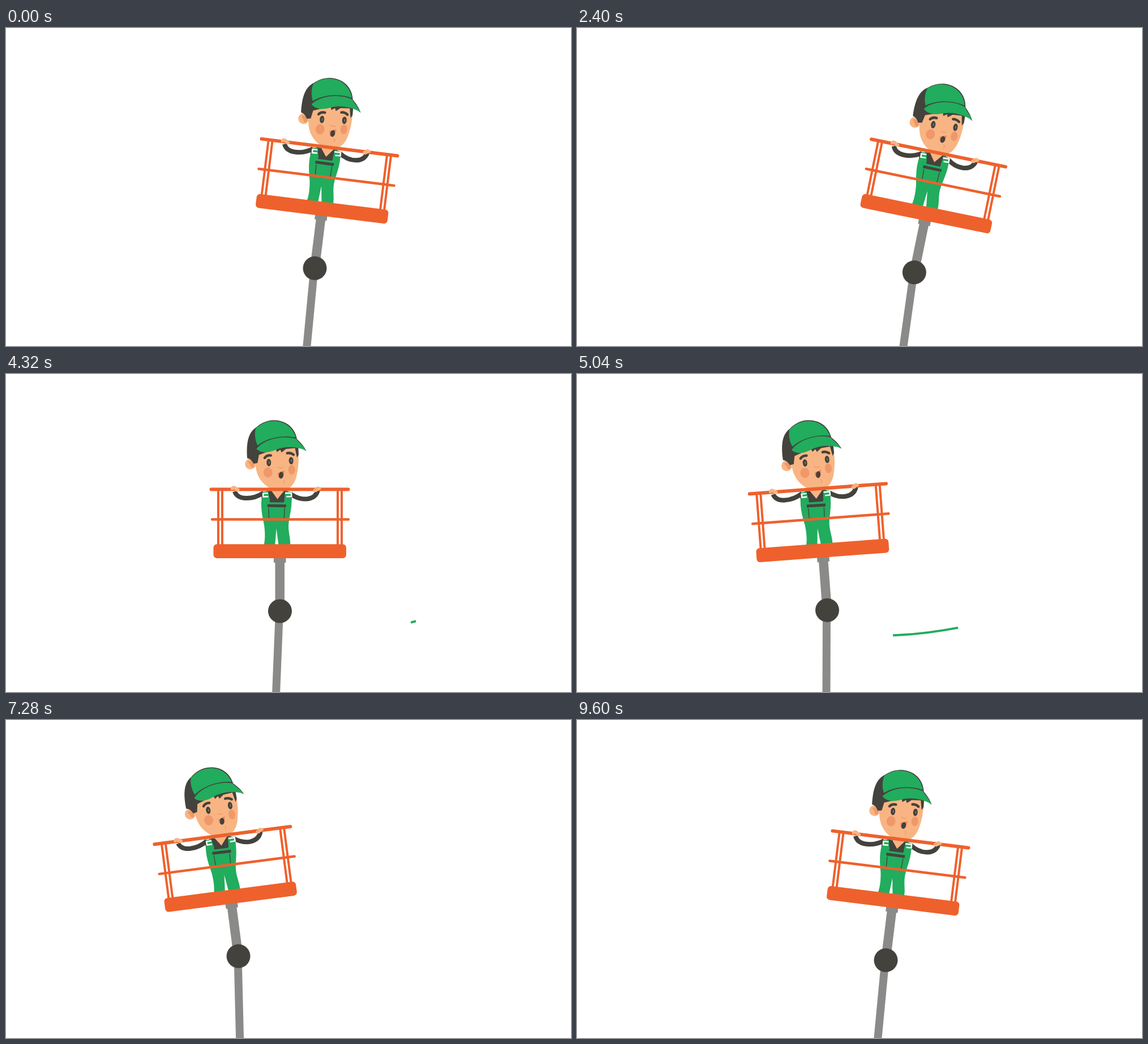
These frames come from a looping animation (998 px wide and 561 px high, 9680 ms). An HTML page:

```html
<!DOCTYPE html>
<html lang="en">
<head>
<meta charset="utf-8">
<title>Worker on a swaying lift</title>
<style>
html, body { margin: 0; width: 100%; height: 100%; overflow: hidden; background: #fff; }
svg { display: block; width: 100vw; height: 100vh; }
.green { fill: #22ac5d; }
.dark { fill: #43423d; }
.skin { fill: #f8b583; }
.blush { fill: #f0986a; }
.grey { fill: #8a8a88; }
.orange { fill: #ee612d; }
.line { fill: none; stroke: #43423d; }
.rail { fill: none; stroke: #ee612d; stroke-linecap: round; }
.round { stroke-linecap: round; }
</style>
</head>
<body>
<svg viewBox="0 0 998 561">
  <g id="gusts" fill="none" stroke="#22ac5d"></g>
  <g id="boom"><rect class="grey" x="-8" width="14" height="220"/></g>
  <g id="lift">
    <rect class="grey" x="-8.5" y="-100" width="16.5" height="100"/>
    <rect class="grey" x="-11" y="-100" width="21.5" height="14.5"/>
    <circle class="dark" r="21"/>
    <g transform="rotate(-1.9) translate(-498 -419.5)">
      <!-- arms and body -->
      <path class="line" stroke-width="8" d="M425 206C430 222 456 222 476 210M572 209C566 227 542 228 523 213"/>
      <path class="dark" d="M482 207L516 207L526 213L524 232H473L472 213Z"/>
      <path class="green" d="M472 221L484 220L487 227L511 228L514 220L525 221C526 240 518 258 518 272C518 285 521 292 520 304H499.500L496.500 274L493 304H473C477 290 476 276 475 266C472 250 470 237 472 221Z"/>
      <path class="green" d="M475 208L484 208L487 224H473ZM514 209L524 210L525 224H512Z"/>
      <path d="M484 211H475V217H484M514 212H525V218H516" fill="none" stroke="#fff" stroke-width="2.500"/>
      <path class="skin" d="M488 200H513V207L500 222L490 207Z"/>
      <path class="line" stroke-width="5" d="M482 233L515 234.500"/>
      <path class="line" stroke-width="1.300" d="M484 237V254Q484 257 488 257L507 257Q511 257 511 253L512 238"/>
      <!-- head -->
      <circle class="skin" cx="454.500" cy="158.500" r="9.500"/>
      <path class="skin" d="M463 140C462 158 463 171 469 183C476 196 489 206 503 208C521 209 531 197 535 183C540 165 541 147 539 128Z"/>
      <path class="blush" d="M450 154Q457 151 461 156V164Q455 167 454 160Z"/>
      <path class="dark" d="M467 94C453 102 448 119 449 148C455 149 458 154 460 158L467 157L470 143L500 133L502 139L508 135L510 140L518 134L534 133L537 150L540 145V130L554 139C548 126 541 121 538 117C535 95 517 82 496 82.500C484 83 474 88 467 94Z"/>
      <path class="green" d="M466 96C479 85 490 84 497 84C517 84 532 97 536 114.500C516 109 487 112 468 126C464 117 463 105 466 96Z"/>
      <path class="green" d="M466 132C482 113 517 109.500 537 117C541 124 548 128 553 138C537 130 517 129 502 134C489 140 474 141 466 132Z"/>
      <path class="line round" stroke-width="4.500" stroke-linejoin="round" d="M480 148.500Q484 143.500 491 144.500M520 141.500Q526 140.500 531 144.500"/>
      <ellipse class="dark" cx="487" cy="157" rx="4" ry="6.500"/>
      <ellipse class="dark" cx="526.500" cy="155" rx="4" ry="6.500"/>
      <path d="M487.500 155V159M527 153V157" stroke="#85857f" stroke-width="1.500"/>
      <ellipse class="blush" cx="485" cy="174.500" rx="8" ry="9"/>
      <ellipse class="blush" cx="527" cy="171" rx="6" ry="8.500"/>
      <path d="M502 165Q507 169 512 166M511 189Q515 191 511 195" fill="none" stroke="#f0986a" stroke-width="1.400"/>
      <path d="M502 176L514 172L512 182Q508 189 503 183Z" fill="#ee8058"/>
      <ellipse class="dark" cx="508" cy="180" rx="4" ry="6" transform="rotate(8 508 180)"/>
    </g>
    <!-- basket -->
    <path class="rail" stroke-width="6" d="M-121.500 -214.800H120.500"/>
    <path class="rail" stroke-width="4.500" d="M-120 -161.800H121"/>
    <path class="rail" stroke-width="4" d="M-109 -213V-115M-102 -213V-115M102 -213V-115M109 -213V-115"/>
    <rect class="orange" x="-117.500" y="-118" width="234.500" height="24.800" rx="6"/>
    <!-- hands -->
    <g transform="rotate(-1.9) translate(-498 -419.5)">
      <path class="skin" d="M418 200Q421 194 427 197L434 202L433 206L428 206L425 203L419 204ZM564 207L571 202Q577 202 578 207L573 209L569 212L564 211Z"/>
      <path d="M420 203L425 202M566 208L571 206" stroke="#f0986a" stroke-width="1.200"/>
    </g>
  </g>
</svg>
<script>
const LOOP = 9680, PERIOD = 9600, STEP = 80;
const byId = id => document.getElementById(id);

// time, joint x, basket angle
const sway = [
  [0, 545.5, 7.07], [1200, 604, 12.5], [1680, 621, 14.3], [2080, 612, 13.3],
  [3520, 532.5, 5], [5040, 442, -4.3], [6440, 378, -10.9], [7280, 410.5, -7.4], [8800, 498, 1.9]
];

// path, line width, head start, tail start, travel time
const gusts = [
  ["M246 377C290 389 330 393 362 395C420 401 486 398 484 366Q483 340 455 338Q430 338 428 358", 4, 488, 798, 1000],
  ["M724 436C680 448 620 458 569 460.5C520 463 480 460 483 430Q485 405 512 404Q535 404 537 420", 4, 4140, 4590, 1800],
  ["M116 280C150 287 174 290 200 291.5C240 294 270 290 268 268Q265 246 240 246Q214 246 212 262", 2.5, 8150, 8500, 1000]
].map(([d, width, head, tail, time]) => {
  const path = document.createElementNS("http://www.w3.org/2000/svg", "path");
  path.setAttribute("d", d);
  path.setAttribute("pathLength", 1);
  path.setAttribute("stroke-width", width);
  byId("gusts").append(path);
  return { path, head, tail, time };
});

const smooth = u => {
  u = Math.min(1, Math.max(0, u));
  return u * u * (3 - 2 * u);
};

// Keys repeat every period
function key(i) {
  const n = sway.length, lap = Math.floor(i / n), [t, x, angle] = sway[i - lap * n];
  return [t + lap * PERIOD, x, angle];
}

// Smooth cubic through the sway keys
function swayAt(t, column) {
  let i = 0;
  while (key(i + 1)[0] <= t) i++;
  const [a, b, c, d] = [i - 1, i, i + 1, i + 2].map(key);
  const span = c[0] - b[0], u = (t - b[0]) / span;
  const slope = (p, q) => (q[column] - p[column]) / (q[0] - p[0]) * span;
  const e = smooth(u);
  return b[column] * (1 - e) + c[column] * e
    + slope(a, c) * u * (1 - u) ** 2 - slope(b, d) * u * u * (1 - u);
}

function draw(now) {
  const t = Math.floor(now % LOOP / STEP) * STEP;
  const x = swayAt(t, 1), y = 416.5 + (x - 425) ** 2 / 2000;
  const place = (id, angle) =>
    byId(id).setAttribute("transform", `translate(${x} ${y}) rotate(${angle})`);
  place("boom", -1.4 + (x - 410.5) * 0.05065);
  place("lift", swayAt(t, 2));

  for (const { path, head, tail, time } of gusts) {
    const end = smooth((t - head) / time), start = smooth((t - tail) / time);
    path.style.display = end > start ? "" : "none";
    path.setAttribute("stroke-dasharray", `${end - start} 2`);
    path.setAttribute("stroke-dashoffset", -start);
  }
}

const began = performance.now();
function tick() {
  draw(performance.now() - began);
  requestAnimationFrame(tick);
}
tick();
</script>
</body>
</html>
```
